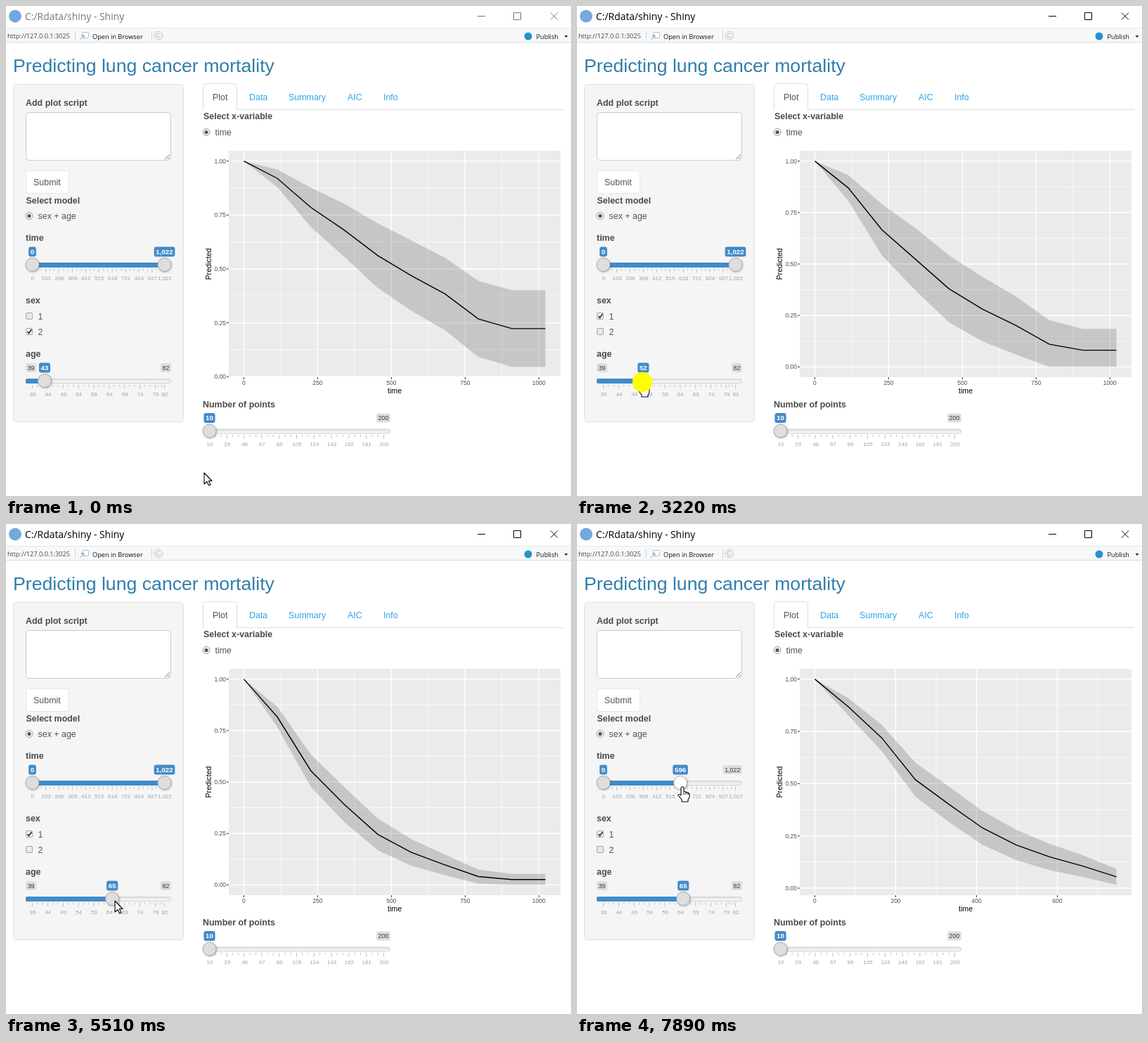
An HTML page with a canvas for the animation above (8 s loop, 804 px wide and 697 px high).

```html
<!DOCTYPE html>
<html lang="en">
<head>
<meta charset="utf-8">
<title>Shiny app</title>
<style>
html, body { margin: 0; width: 100%; height: 100%; overflow: hidden; background: #fff; }
canvas { display: block; }
</style>
</head>
<body>
<canvas width="804" height="697"></canvas>
<script>
const c = document.querySelector('canvas').getContext('2d');
const LOOP = 8000, SANS = '"Liberation Sans", Arial, sans-serif', UI = '"Open Sans", "Noto Sans", sans-serif';
const BLUE = '#428bca';

// Pointer moves: start, end, x, y
const moves = [[50, 130, 99, 615], [230, 920, 30, 443], [1630, 1790, 35, 460], [1950, 2590, 45, 521],
  [2670, 2830, 53, 532], [3060, 3220, 93, 535], [3220, 3380, 97, 536], [3930, 4010, 99, 539],
  [4080, 4400, 124, 541], [4630, 4710, 131, 536], [4710, 4790, 124, 537], [4870, 5270, 155, 537],
  [5510, 5750, 50, 392], [5830, 6150, 235, 384], [6230, 6310, 230, 373], [6470, 6870, 178, 374],
  [7330, 7890, 150, 374]];
const presses = [[1160, 1320], [1790, 1950], [2980, 3380], [4010, 4400], [4790, 5270], [6390, 7020], [7330, 7890]];
const hands = [[2830, 4500], [4790, 5400], [6310, LOOP]];
const ageKeys = [[3060, 43], [3220, 52], [4080, 52], [4400, 58], [4870, 58], [5270, 65]];
const timeKeys = [[6470, 1022], [6870, 746], [7330, 746], [7890, 596]];

// Plot redraws: start, sexes, age, largest time
const plots = [[0, [2], 43, 1022], [1550, [1, 2], 43, 1022], [2270, [1], 43, 1022], [3690, [1], 52, 1022],
  [4630, [1], 58, 1022], [5510, [1], 65, 1022], [7180, [1], 65, 746]];
// Baseline cumulative hazard: time, hazard
const hazardKeys = [[0, 0], [83, .098], [113.6, .14], [166, .228], [227, .405], [341, .648], [454, .967],
  [568, 1.27], [681, 1.6], [746, 2.007], [795, 2.207], [908, 2.513]];

function lerp(keys, t) {
  const i = keys.findLastIndex(k => k[0] <= t), a = keys[i], b = keys[i + 1];
  if (!a) return keys[0][1];
  return b ? a[1] + (b[1] - a[1]) * (t - a[0]) / (b[0] - a[0]) : a[1];
}

function pointerAt(t) {
  let x = 282, y = 664;
  for (const [start, end, toX, toY] of moves) {
    const k = Math.min(1, Math.max(0, (t - start) / (end - start)));
    x += (toX - x) * k;
    y += (toY - y) * k;
  }
  const during = spans => spans.some(([a, b]) => t >= a && t < b);
  return { x: Math.round(x), y: Math.round(y), hand: during(hands), pressed: during(presses) };
}

function text(s, x, y, size = 12.44, color = '#555', { bold, align = 'left', font = SANS } = {}) {
  c.font = `${bold ? 'bold ' : ''}${size}px ${font}`;
  c.textAlign = align;
  c.fillStyle = color;
  c.fillText(s, x, y);
}

function box(x, y, w, h, r, fill, border) {
  c.beginPath();
  c.roundRect(x, y, w, h, r);
  if (fill) { c.fillStyle = fill; c.fill(); }
  if (border) { c.strokeStyle = border; c.lineWidth = 1; c.stroke(); }
}

function disc(x, y, r, fill, border) {
  box(x - r, y - r, 2 * r, 2 * r, r, fill, border);
}

function line(points, color = '#000', width = 1) {
  c.beginPath();
  points.forEach(p => c.lineTo(...p));
  c.strokeStyle = color;
  c.lineWidth = width;
  c.stroke();
}

function windowBar(active) {
  const ink = active ? '#000' : '#777';
  disc(13, 14.5, 9, '#74a9db');
  text('C:/Rdata/shiny - Shiny', 27, 20, 13.9, ink, { font: UI });
  line([[671, 14.5], [682, 14.5]], ink);
  box(722.5, 9.5, 10, 10, 0, null, ink);
  line([[775, 9.5], [785, 19.5]], ink);
  line([[785, 9.5], [775, 19.5]], ink);

  c.fillStyle = '#f7f8f9';
  c.fillRect(0, 31, 804, 21);
  line([[0, 31.5], [804, 31.5]], '#e4e7e9');
  line([[0, 51.5], [804, 51.5]], '#d9dee1');
  text('http://127.0.0.1:3025', 2, 46, 9.16, '#444', { font: UI });
  for (const x of [98.5, 207.5]) line([[x, 35], [x, 49]], '#cfd3d6');
  box(108.5, 37.5, 9, 8, 1, '#fff', '#b4bcc3');
  line([[105, 48], [111, 42], [107.5, 42], [111, 42], [111, 45.5]], '#7fa9cc');
  text('Open in Browser', 123, 47, 9.2, '#111', { font: UI });
  disc(217, 42, 6, '#f2f2f2', '#c4c8cb');
  c.beginPath();
  c.arc(217, 42, 3, .3, 5.2);
  c.strokeStyle = '#b5babd';
  c.stroke();
  disc(743, 43, 5.5, '#2591d0');
  text('Publish', 754.5, 47, 9.2, '#111', { font: UI });
  c.fillStyle = '#222';
  c.fill(new Path2D('M794.5 42h5l-2.5 3z'));
}

function radio(x, y) {
  disc(x, y, 5, '#f6f6f6', '#999');
  disc(x, y, 2.6, '#555');
}

function checkbox(y, on) {
  box(28.5, y + .5, 9, 9, 1.5, on ? '#f4f4f4' : '#e8e8e8', '#a5a5a5');
  if (on) line([[30.5, y + 5], [32.5, y + 7.5], [36.5, y + 2]], '#333', 1.8);
}

function heading(s, x, y) {
  text(s, x, y, 12.44, '#4b4b4b', { bold: true });
}

function page(t) {
  text('Predicting lung cancer mortality', 10, 94, 26.67, '#317eac');
  box(10.5, 111.5, 242, 480, 4, '#f5f5f5', '#e0e0e0');
  heading('Add plot script', 28, 141.5);
  box(28.5, 151.5, 206, 68, 4, '#fff', '#ccc');
  line([[226, 218], [233, 211]], '#777');
  line([[230, 218], [233, 215]], '#777');
  box(28.5, 234.5, 61, 32, 3, '#fff', '#e6e6e6');
  text('Submit', 39, 255);
  heading('Select model', 28.5, 280.5);
  radio(33, 298.5);
  text('sex + age', 45.5, 303);
  heading('time', 28, 334);
  heading('sex', 28, 423);
  checkbox(436, t >= 1240);
  checkbox(458, t < 1870);
  text('1', 45.5, 445.5);
  text('2', 45.5, 467.5);
  heading('age', 28, 498.5);

  line([[280, 147.5], [793, 147.5]], '#ddd');
  box(280.5, 110.5, 48, 42, [4, 4, 0, 0], '#fff', '#ddd');
  c.fillStyle = '#fff';
  c.fillRect(279, 148, 51, 6);
  text('Plot', 294, 133.5);
  for (const [s, x] of [['Data', 346], ['Summary', 402], ['AIC', 486], ['Info', 537]])
    text(s, x, 133.5, 12.44, '#2fa4e7');
  heading('Select x-variable', 281, 161);
  radio(285, 179.5);
  text('time', 297.5, 183.5);
  heading('Number of points', 280, 570.5);
}

// A range slider: bar ends, bar centre, limits, label step, values
function slider(x0, x1, y, min, max, step, values, pointer) {
  const pos = v => x0 + 9.5 + (x1 - x0 - 19) * (v - min) / (max - min);
  const show = v => v.toLocaleString('en-US');
  const at = values.map(pos);
  const shade = c.createLinearGradient(0, y - 4, 0, y + 4);
  shade.addColorStop(0, '#dcdcdc');
  shade.addColorStop(1, '#fff');
  box(x0 + .5, y - 3, x1 - x0 - 1, 6, 3, shade, '#d0d0d0');
  const start = at.length > 1 ? at[0] : x0;
  box(start, y - 3.5, at.at(-1) - start, 7, 2, BLUE);

  const marks = [];
  for (let v = min; v < max; v += step) marks.push(v);
  marks.push(max);
  marks.forEach((v, i) => {
    const x = pos(v), gap = pos(marks[i + 1] ?? v) - x;
    line([[x, y + 5], [x, y + 10.5]], '#a9c3d8');
    for (const k of [1 / 3, 2 / 3])
      if (gap) line([[x + gap * k, y + 5], [x + gap * k, y + 8]], '#b9c0c6');
    text(show(v), x + .5, y + 21, 8, '#99a4ac', { align: 'center' });
  });

  const width = (v, size, bold) => {
    c.font = `${bold ? 'bold ' : ''}${size}px ${SANS}`;
    return c.measureText(show(v)).width + 5.3;
  };
  const tags = values.map((v, i) => {
    const w = width(v, 9.78, true), x = at[i] - w / 2;
    box(x, y - 26, w, 14, 3, BLUE);
    text(show(v), at[i], y - 15.7, 9.78, '#fff', { bold: true, align: 'center' });
    return [x, x + w];
  });
  for (const v of [min, max]) {
    const w = width(v, 8.89), x = v === min ? x0 : x1 - w;
    if (tags.some(([l, r]) => r >= x && l <= x + w)) continue;
    box(x, y - 25.5, w, 13, 3, '#dedede');
    text(show(v), x + w / 2, y - 15.7, 8.89, '#333', { align: 'center' });
  }

  for (const x of at) {
    const hot = pointer.hand && Math.hypot(pointer.x - x, pointer.y - y) < 14;
    const fill = hot ? '#fff' : '#dedede';
    c.save();
    c.shadowColor = 'rgba(0,0,0,.3)';
    c.shadowBlur = 3;
    c.shadowOffsetX = c.shadowOffsetY = 1;
    disc(x, y - .5, 9.5, fill);
    c.restore();
    disc(x, y - .5, 9.5, fill, '#ababab');
  }
}

// Survival estimate with confidence limits at ten times
function curve(sex, age, last) {
  const risk = Math.exp(.017 * (age - 43)) * (sex === 2 ? .597 : 1);
  return Array.from({ length: 10 }, (_, i) => {
    const time = last * i / 9, base = lerp(hazardKeys, time), h = base * risk, s = Math.exp(-h);
    const spread = .21 + .00055 * (age - 63) ** 2 + (sex === 2 ? .02 : 0)
      + .012 / (base || 1) + .1 * Math.max(0, base - 1.75);
    const half = s * h * spread;
    return { time, s, low: Math.max(0, s - half), high: Math.min(1, s + half) };
  });
}

function plot([, sexes, age, last]) {
  const L = 317, T = 206, H = 322, W = sexes.length > 1 ? 428 : 472;
  const curves = sexes.map(s => curve(s, age, last));
  const low = Math.min(...curves.flat().map(p => p.low));
  const X = v => L + W * (v / last + .05) / 1.1;
  const Y = v => T + H * ((1 - v) / (1 - low) + .05) / 1.1;
  const step = last > 1000 ? 250 : 200;
  const dash = i => c.setLineDash(i ? [2, 2] : []);
  c.fillStyle = '#ebebeb';
  c.fillRect(L, T, W, H);

  for (const minor of [true, false]) {
    const width = minor ? .7 : 1.4;
    for (let v = minor ? step / 2 : 0; X(v) < L + W; v += step) {
      line([[X(v), T], [X(v), T + H]], '#fff', width);
      if (minor) continue;
      line([[X(v), T + H], [X(v), T + H + 3]], '#333');
      text(v, X(v), 538.5, 8.5, '#4d4d4d', { align: 'center' });
    }
    for (let v = minor ? .875 : 1; v >= 0 && Y(v) < T + H; v -= .25) {
      line([[L, Y(v)], [L + W, Y(v)]], '#fff', width);
      if (minor) continue;
      line([[L - 3, Y(v)], [L, Y(v)]], '#333');
      text(v.toFixed(2), 313, Y(v) + 3, 8.5, '#4d4d4d', { align: 'right' });
    }
  }

  for (const pts of curves) {
    c.beginPath();
    pts.forEach(p => c.lineTo(X(p.time), Y(p.high)));
    pts.toReversed().forEach(p => c.lineTo(X(p.time), Y(p.low)));
    c.fillStyle = 'rgba(51,51,51,.2)';
    c.fill();
  }
  curves.forEach((pts, i) => {
    dash(i);
    line(pts.map(p => [X(p.time), Y(p.s)]), '#000', 1.4);
  });
  dash(0);

  text('time', L + W / 2, 551, 10.65, '#000', { align: 'center' });
  c.save();
  c.translate(292, 367);
  c.rotate(-Math.PI / 2);
  text('Predicted', 0, 0, 10.65, '#000', { align: 'center' });
  c.restore();

  if (sexes.length < 2) return;
  text('sex', 758, 353, 10.65, '#000');
  sexes.forEach((s, i) => {
    const y = 366.5 + 16 * i;
    box(758.5, y - 8, 16, 16, 0, '#f2f2f2');
    dash(i);
    line([[760.5, y], [773, y]], '#000', 1.4);
    dash(0);
    text(s, 779, y + 3, 8.5, '#000');
  });
}

const ARROW = new Path2D('M0 0V16L4 12.5L6.5 18L9 17L6.5 11.5H11Z');
const HAND = new Path2D('M-2 11V1Q0-1.5 2 1V7Q4 5.5 5 8Q7 6.5 8 9Q10 8 10 11V15L8 18V21H-1V18L-6 12Q-5 9-2 12Z');

function drawPointer({ x, y, hand, pressed }) {
  const shape = hand ? HAND : ARROW;
  c.save();
  c.translate(x, y);
  c.lineJoin = 'round';
  c.fillStyle = '#fff';
  c.strokeStyle = '#000';
  c.lineWidth = 1.1;
  c.fill(shape);
  c.stroke(shape);
  if (hand) for (const fx of [2, 5, 8]) line([[fx, 8], [fx, 11]]);
  c.restore();
  if (pressed) disc(x, y, 14.3, '#ff0');
}

function draw(now) {
  const t = now % LOOP, pointer = pointerAt(t);
  c.fillStyle = '#fff';
  c.fillRect(0, 0, 804, 697);
  windowBar(t >= 1160);
  page(t);
  plot(plots.findLast(p => p[0] <= t));
  slider(28, 235, 368.5, 0, 1022, 103, [0, Math.round(lerp(timeKeys, t))], pointer);
  slider(28, 235, 533.5, 39, 82, 5, [Math.round(lerp(ageKeys, t))], pointer);
  slider(280, 547, 605, 10, 200, 19, [10], pointer);
  drawPointer(pointer);
  requestAnimationFrame(draw);
}
requestAnimationFrame(draw);
</script>
</body>
</html>
```
